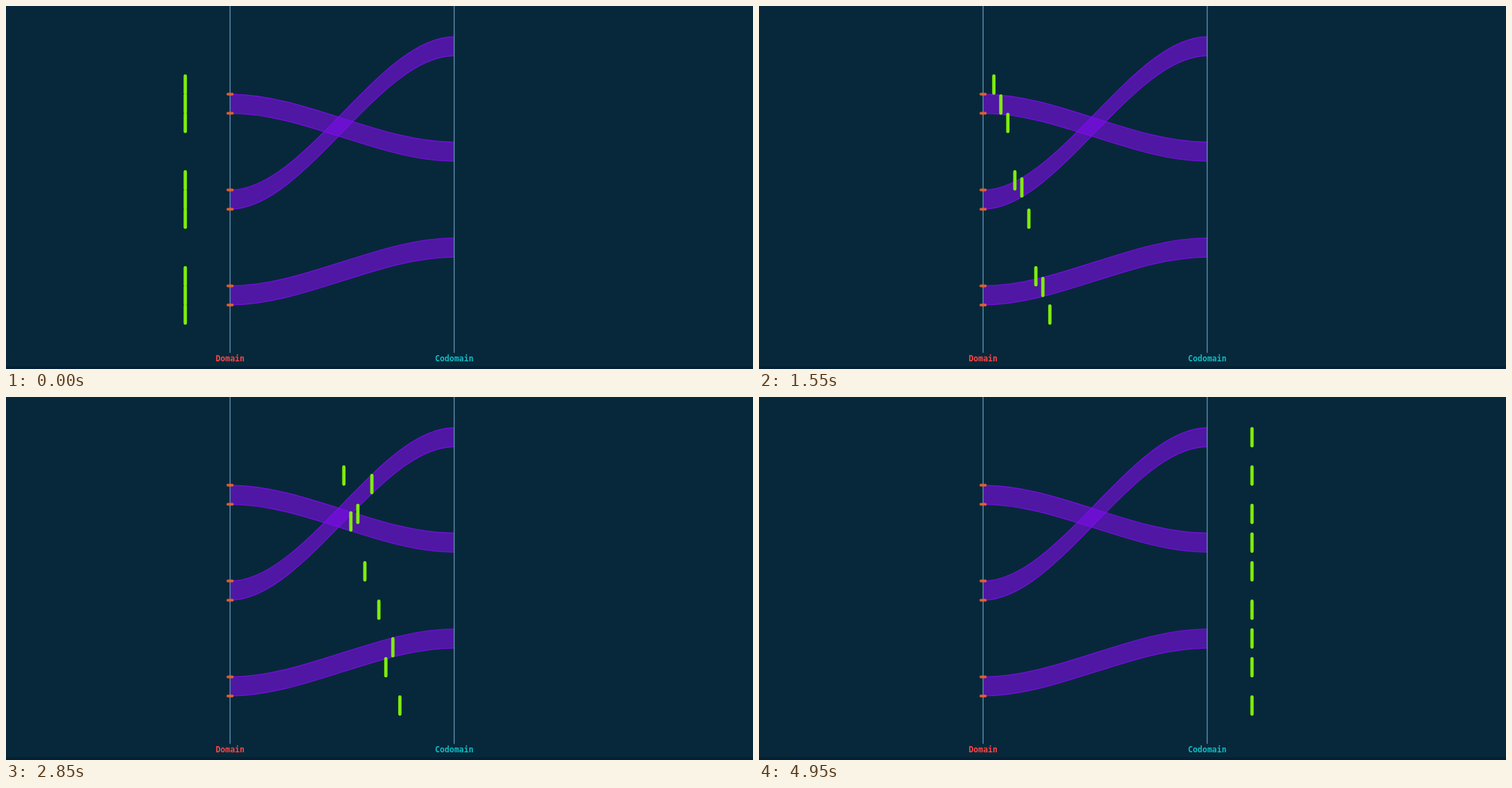
Animation of 1074x522 px, one loop 5000 ms. Source, as an HTML page with a canvas:

```html
<!DOCTYPE html>
<html lang="en">
<head>
<meta charset="utf-8">
<title>Domain to codomain</title>
<style>
html, body { margin: 0; width: 100%; height: 100%; overflow: hidden; background: #07283a; }
canvas { display: block; }
</style>
</head>
<body>
<canvas id="stage" width="1074" height="522"></canvas>
<script>
const ctx = document.getElementById('stage').getContext('2d');
const UNIT = 27.56, TOP = 44.1;
const START = 257.76, DOMAIN = 322.2, CODOMAIN = 644.4, END = 708.84;
const SPAN = CODOMAIN - DOMAIN;
const STEP = 50, STEPS = 100;

// [domain unit, codomain unit] of each mapped interval
const bands = [[3, 5.5], [8, 0], [13, 10.5]];
const pieces = bands.flatMap(([a, b]) => [[a - 1, a - 1], [a, b], [a + 1, a + 1]]);

const yOf = u => TOP + u * UNIT;
const clamp = v => Math.min(1, Math.max(0, v));
const smooth = v => v * v * (3 - 2 * v);

function line(x1, y1, x2, y2, color, width, cap = 'round') {
  ctx.strokeStyle = color;
  ctx.lineWidth = width;
  ctx.lineCap = cap;
  ctx.beginPath();
  ctx.moveTo(x1, y1);
  ctx.lineTo(x2, y2);
  ctx.stroke();
}

function curve(x1, y1, x2, y2) {
  const dx = (x2 - x1) / 3;
  ctx.lineTo(x1, y1);
  ctx.bezierCurveTo(x1 + dx, y1, x2 - dx, y2, x2, y2);
}

function drawBand([a, b]) {
  ctx.fillStyle = 'rgba(127,13,236,.6)';
  ctx.beginPath();
  curve(DOMAIN, yOf(a), CODOMAIN, yOf(b));
  curve(CODOMAIN, yOf(b + 1), DOMAIN, yOf(a + 1));
  ctx.fill();
  ctx.strokeStyle = 'rgba(127,13,236,.9)';
  ctx.lineWidth = 1.2;
  for (const k of [0, 1]) {
    ctx.beginPath();
    curve(DOMAIN, yOf(a + k), CODOMAIN, yOf(b + k));
    ctx.stroke();
  }
}

function drawAxis(x, name, color) {
  line(x, 0, x, yOf(16.5), '#5c8db0', 1.4, 'butt');
  ctx.fillStyle = color;
  ctx.fillText(name, x, 510.5);
}

// Seven equal phases: approach, staggered crossing (five), departure
function drawPiece([a, b], i, phase) {
  const lag = (pieces.length - 1 - i) / (pieces.length - 1);
  const cross = clamp((phase - 1 - lag) / 4);
  const x = START + (DOMAIN - START) * clamp(phase)
    + SPAN * cross + (END - CODOMAIN) * clamp(phase - 6);
  const y = yOf(a + (b - a) * smooth(cross));
  line(x, y + 1.5, x, y + UNIT - 1.5, '#7fec0d', 4.8);
}

function draw(now) {
  const step = Math.floor((now + 0.5) / STEP) % STEPS;
  const phase = 7 * step / (STEPS - 1);
  ctx.fillStyle = '#07283a';
  ctx.fillRect(0, 0, 1074, 522);
  ctx.fillStyle = '#051f35';
  ctx.fillRect(0, 518, 1074, 4);
  ctx.font = 'bold 11.5px "DejaVu Sans Mono", monospace';
  ctx.textAlign = 'center';

  bands.forEach(drawBand);
  drawAxis(DOMAIN, 'Domain', '#ff4444');
  drawAxis(CODOMAIN, 'Codomain', '#0fbcc4');
  pieces.forEach((p, i) => drawPiece(p, i, phase));
  for (const [a] of bands)
    for (const k of [0, 1])
      line(DOMAIN - 3.2, yOf(a + k), DOMAIN + 3.2, yOf(a + k), 'rgba(236,98,45,.9)', 4);
  requestAnimationFrame(draw);
}
requestAnimationFrame(draw);
</script>
</body>
</html>
```
